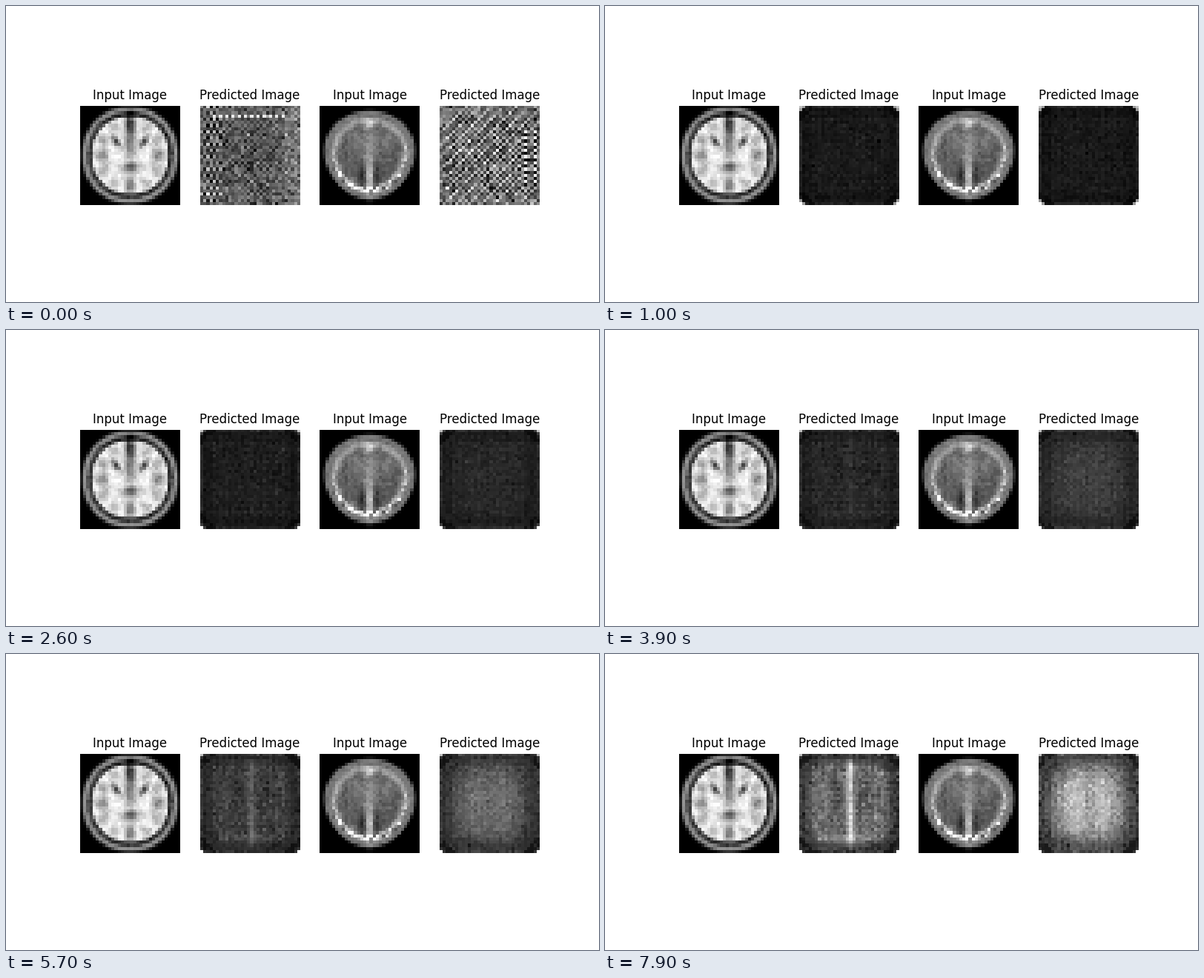
Animation of 800x400 px, one loop 8 s. Source, as a matplotlib script:

```python
import numpy as np
import matplotlib.pyplot as plt
from matplotlib.animation import FuncAnimation

N, FRAMES, STEP = 32, 80, 100
WOVEN, SETTLED = 4, 10  # steps at which the early textures hand over
MID = N / 2

rng = np.random.default_rng(11)
row, col = np.mgrid[0:N, 0:N]
x, y = col + 0.5, row + 0.5
side = np.abs(x - MID)
to_x, to_y = np.minimum(col, N - 1 - col), np.minimum(row, N - 1 - row)
edge = np.minimum(to_x, to_y)
odd_col, odd_row = 1 - 2 * (col % 2), 1 - 2 * (row % 2)


def grain(amount):
    return amount * rng.normal(size=(N, N))


def bell(v, center, width):
    return np.exp(-0.5 * ((v - center) / width) ** 2)


def spots(offset, cy, sx, sy, lean=0):
    """Soft spots mirrored about the midline; offset 0 gives one spot."""
    return bell(side, offset + lean * (y - cy), sx) * bell(y, cy, sy)


def radius(rx, ry, power=2):
    return (np.abs((x - MID) / rx) ** power + np.abs((y - MID) / ry) ** power) ** (1 / power)


def disc(r, limit, soft=0.06):
    return np.clip((limit - r) / soft + 0.5, 0, 1)


def bright_scan():
    r = radius(15.3, 15.5, 2.15)
    angle = np.arctan2(y - MID, side)
    img = 0.16 * disc(r, 1) + 0.8 * disc(r, 0.8) + 0.42 * bell(r, 0.94, 0.04)
    img -= 0.12 * bell(r, 0.66, 0.1) * (1 + np.cos(12 * angle))
    img -= 0.65 * spots(4.5, 11.6, 0.8, 1.5, -0.5)
    img -= 0.45 * spots(0, 6.5, 1.5, 3.2) + 0.4 * spots(0, 13, 1.2, 4)
    img -= 0.5 * spots(0, 20, 2.2, 1.1) + 0.35 * spots(0, 25, 1.2, 2)
    img -= 0.28 * spots(8.3, 16, 1.3, 3)
    return np.clip(img + grain(0.04) * disc(r, 0.95), 0, 1)


def dim_scan():
    r = radius(14.6 - 0.1 * (y - 14), 14.2)
    lower = np.clip((y - 8) / 18, 0, 1)
    rim = bell(r, 0.79, 0.055)
    img = 0.36 * disc(r, 1) + 0.1 * bell(r, 0.94, 0.04)
    img += rim * (0.26 + 0.2 * lower + 0.22 * lower * rng.normal(size=(N, N)))
    img += 0.2 * spots(0, 13, 1.6, 5) + 0.4 * spots(0, 23, 0.8, 4)
    img += 0.1 * spots(5, 11, 2, 3) + 0.35 * spots(0, 6, 1, 0.9)
    img -= 0.18 * spots(2.2, 23, 0.9, 3)
    return np.clip(img + grain(0.035) * disc(r, 0.95), 0, 1)


def noisy_left():
    img = 0.38 + grain(0.1) + 0.05 * odd_col * odd_row - 0.06 * spots(0, 14, 8, 8)
    img += 0.35 * odd_col * np.cos(np.pi * row / 2) * bell(col, 3, 2)
    img += 0.08 * (col > 26)
    img[3, 4:28:2] = 0.92
    return img


def noisy_right():
    img = 0.45 + grain(0.13)
    img += 0.17 * odd_col * odd_row * np.clip(edge / 4, 0.4, 1)
    img += 0.1 * np.cos(np.pi * (col + row) / 2)
    img[8:26, 27:31:3] = 0.5 + 0.45 * odd_row[8:26, 27:31:3]
    return img


def woven(level, dot_col, focus):
    """Short rising dashes on a four-cell lattice with one dotted column."""
    dash = ((col + row) % 4 == 3) * (0.2 + 0.5 * np.sin(np.pi * (col % 4) / 3))
    img = level + grain(0.07) + 0.04 * odd_col * odd_row + focus * dash
    img -= 0.1 * (row % 4 == 1)
    img[2::4, dot_col] = 0.97
    return img


def make_drift():
    """Unit noise that turns slowly from one random field to the next."""
    still, fields = rng.normal(size=(N, N)), rng.normal(size=(16, N, N))

    def drift(t):
        k, f = divmod(t / 6, 1)
        k, turn = int(k), f * np.pi / 2
        moving = np.cos(turn) * fields[k] + np.sin(turn) * fields[k + 1]
        return 0.75 * still + 0.66 * moving
    return drift


def settled(growth, noise, img):
    """Shared finish: grid texture, speckled border and light corners."""
    img = img + (0.023 + 0.04 * growth ** 2) * (noise + 0.3 * odd_col + 0.2 * odd_row)
    img = img - 0.06 * ((edge > 0) & (edge < 4) & (noise > 0.4))
    img = img + 0.04 * (1 - growth) * (edge == 0)
    corner = to_x + to_y
    img = np.where((corner < 5) & (noise > -0.6), 0.4 * img, img)
    img = np.where(corner == 1, 0.2 + 0.4 * (1 - growth) ** 8, img)
    return np.where(corner == 0, np.where(row > MID, 1, 0.75), img)


box = disc(radius(14.2, 14.8, 4), 0.9, 0.2)
stripe = box * (0.2 + 0.38 * bell(x, MID + 0.3, 0.75)) - 0.12 * spots(4.3, 15, 1.6, 6)
stripe += 0.12 * spots(0, 27.3, 7, 0.8)
glow = 0.5 * np.exp(-1.6 * radius(13.2, 14.5, 2.4) ** 4)
dip = 0.14 * bell(x, MID + 0.7, 1.3) * bell(y, MID, 9)


def late_left(growth, noise):
    return settled(growth, noise, 0.1 + 0.14 * growth ** 1.5 + stripe * growth ** 2.7)


def late_right(growth, noise):
    base = 0.1 + 0.15 * growth
    return settled(growth, noise, base + glow * growth ** 2 - dip * growth ** 4)


class Prediction:
    def __init__(self, first, second, late):
        self.first, self.second, self.late = first, second, late
        self.drift = make_drift()

    def at(self, t):
        if t <= WOVEN:
            a, b, f = self.first, self.second, t / WOVEN
        else:
            growth = max(t - SETTLED, 0) / (FRAMES - 1 - SETTLED)
            a, b = self.second, self.late(growth, self.drift(t))
            f = min((t - WOVEN) / (SETTLED - WOVEN), 1)
        return np.clip((1 - f) * a + f * b, 0, 1)


left = Prediction(noisy_left(), woven(0.22, 1, 0.8), late_left)
right = Prediction(noisy_right(), woven(0.25, 27, 0.2 + 0.6 * spots(0, 15, 8, 9)), late_right)

fig, axes = plt.subplots(1, 4, figsize=(8, 4), dpi=100)
panels = []
for i, (ax, img) in enumerate(zip(axes, [bright_scan(), left.at(0), dim_scan(), right.at(0)])):
    panels.append(ax.imshow(img, cmap="gray", vmin=0, vmax=1))
    ax.set_title("Predicted Image" if i % 2 else "Input Image")
    ax.axis("off")


def update(t):
    panels[1].set_data(left.at(t))
    panels[3].set_data(right.at(t))
    return panels


anim = FuncAnimation(fig, update, frames=FRAMES, interval=STEP, repeat=True, repeat_delay=0)
plt.show()
```
